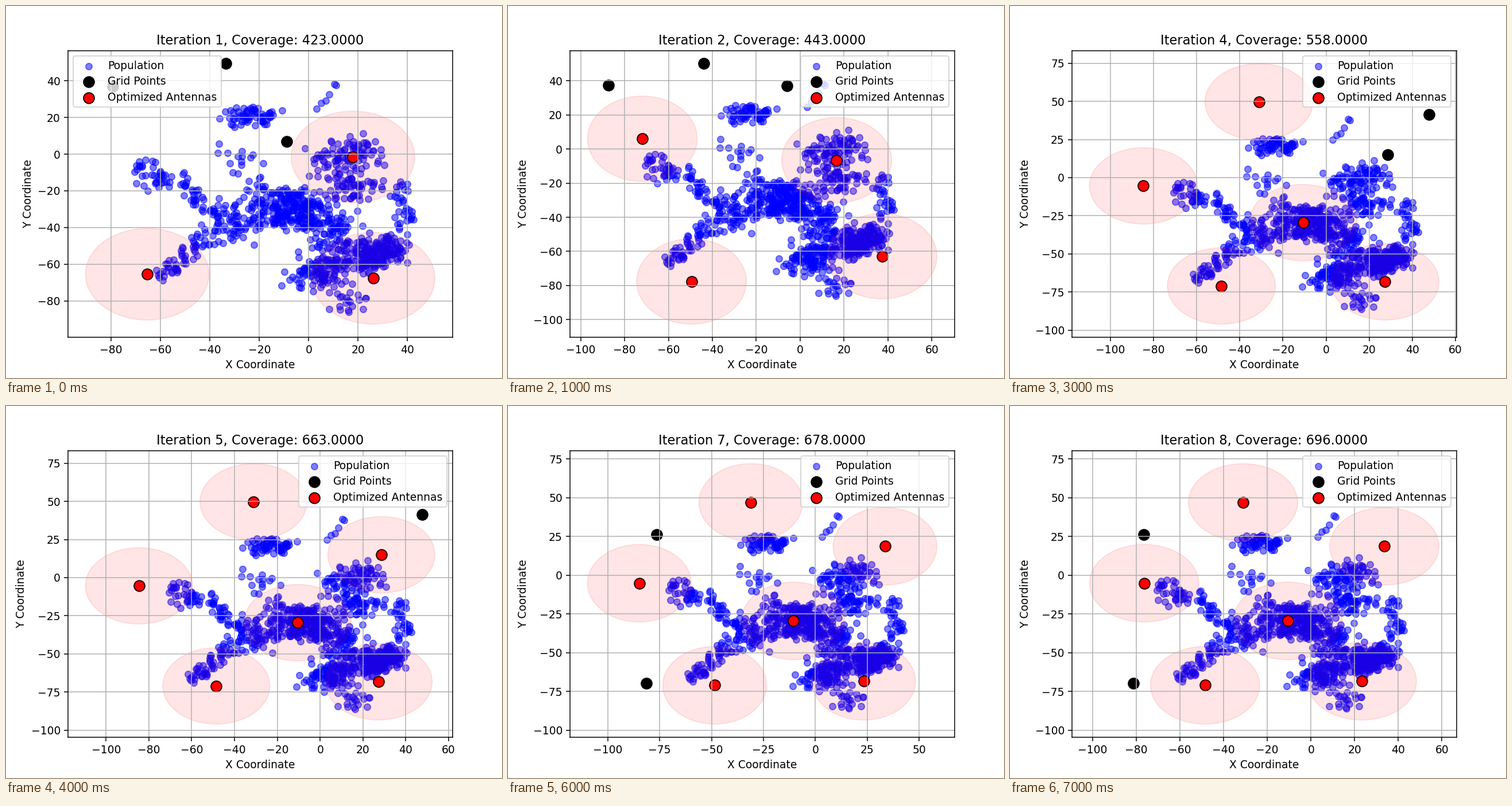
Animation, 864 px wide and 648 px high, one loop 8000 ms. Source, as a matplotlib script:

```python
import numpy as np
import matplotlib.pyplot as plt
from matplotlib.animation import FuncAnimation
from matplotlib.patches import Circle

RADIUS = 25

# People live along strips: count, start, end, spread
STRIPS = [
    (62, (-31, 20), (-16, 20.5), 3.4),
    (6, (3, 23), (12, 37), 1.5),
    (20, (-30, 4), (-24, -14), 4.5),
    (72, (-70, -7), (-38, -28), 4.5),
    (60, (-60, -67), (-38, -42), 3),
    (58, (-35, -30), (-26, -44), 5),
    (250, (-17, -28), (4, -32), 7),
    (85, (4, -3), (25, 2), 5.5),
    (55, (9, -13), (26, -20), 5),
    (32, (38, -12), (38, -42), 3.2),
    (85, (8, -38), (18, -54), 6),
    (180, (21, -58), (34, -51), 4.6),
    (115, (-4, -67), (14, -59), 5.5),
    (20, (8, -80), (22, -81), 3.3),
]


def make_population(rng):
    groups = []
    for n, start, end, spread in STRIPS:
        along = rng.uniform(0, 1, (n, 1))
        offset = rng.uniform(-spread, spread, (n, 2, 2)).sum(axis=1)
        groups.append(start + along * np.subtract(end, start) + offset)
    return np.vstack(groups)


def make_steps():
    """One (coverage, antennas, grid points) entry per iteration."""
    start = [(17.9, -1.5), (-65.4, -65.5), (26.1, -67.7)]
    start_grid = [(-33.6, 49.4), (-9, 6.9), (-79.4, 36.9)]
    second = [(-71.9, 6.1), (-49.5, -77.6), (16.6, -6.5), (37.3, -62.8)]
    second_grid = [(-87.3, 37.3), (-43.9, 50.1), (-6.1, 37)]
    east, corner = (28.6, 15), (47.7, 41.3)
    late_grid = [(-76.5, 26.3), (-81.4, -69.7)]

    sites = dict(north=(-31.1, 49.7), west=(-84.6, -5.4),
                 centre=(-10.6, -1.7), south=(-50.9, -71),
                 low_right=(27.3, -68.3))
    steps = [(423, start, start_grid), (443, second, second_grid)]

    def advance(coverage, grid, **moved):
        sites.update(moved)
        steps.append((coverage, list(sites.values()), grid))

    advance(446, [east, corner])
    advance(558, [east, corner], centre=(-10.6, -29.5), south=(-48.5, -71))
    advance(663, [corner], east=east)
    advance(670, [corner], north=(-31.1, 46.9))
    advance(678, late_grid, west=(-84.8, -5.2), low_right=(23.3, -68.4),
            east=(33.6, 18.6))
    advance(696, late_grid, west=(-76.4, -5.2))
    return steps


population = make_population(np.random.default_rng(12))
steps = make_steps()
fig, ax = plt.subplots(figsize=(6.4, 4.8), dpi=135)


def draw(i):
    coverage, antennas, grid = steps[i]
    ax.clear()
    ax.scatter(*population.T, c="blue", alpha=0.5, label="Population")
    ax.scatter(*zip(*grid), c="black", s=100, label="Grid Points")
    ax.scatter(*zip(*antennas), c="red", s=100, edgecolors="black",
               label="Optimized Antennas")
    for spot in antennas:
        ax.add_patch(Circle(spot, RADIUS, color="red", alpha=0.1))
    ax.autoscale_view()
    ax.set_title(f"Iteration {i + 1}, Coverage: {coverage:.4f}")
    ax.set_xlabel("X Coordinate")
    ax.set_ylabel("Y Coordinate")
    ax.legend(loc="upper left" if i == 0 else "upper right",
              labelspacing=0.45)
    ax.grid(True)
    return ()


anim = FuncAnimation(fig, draw, frames=len(steps), interval=1000,
                     repeat=True, repeat_delay=0)
plt.show()
```
